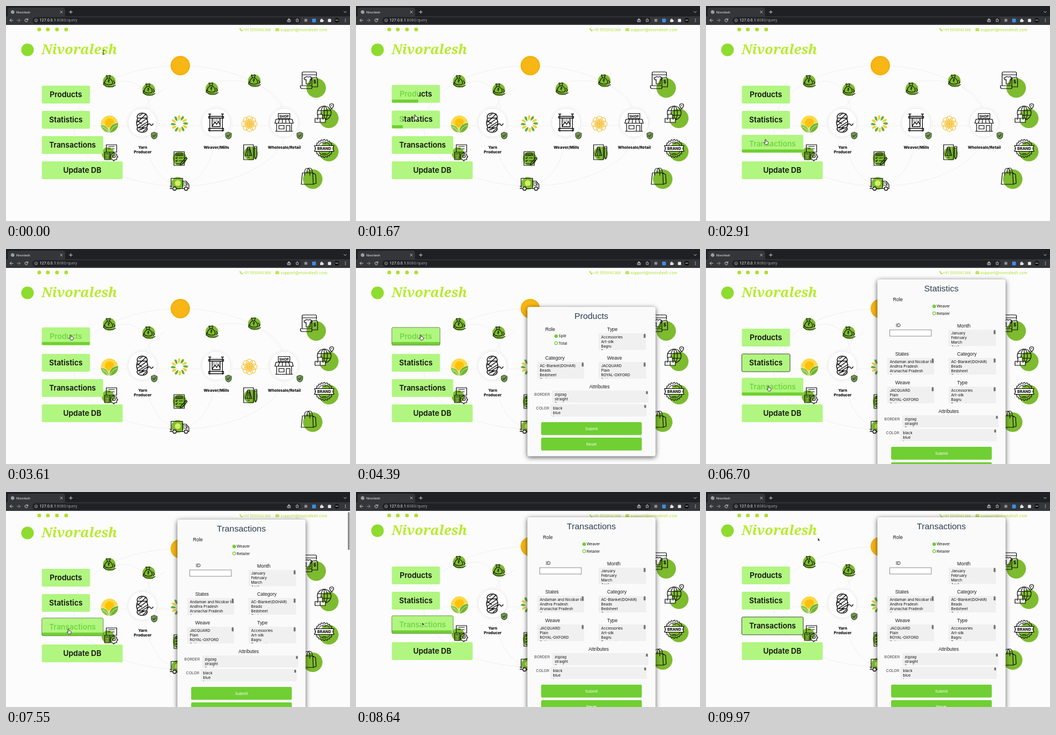
An HTML page with a canvas that plays this animation: 600x375 px, repeating every 10 s.

```html
<!DOCTYPE html>
<html lang="en">
<head>
<meta charset="utf-8">
<title>Supply chain dashboard</title>
<style>
html, body { margin: 0; width: 100%; height: 100%; overflow: hidden; background: #fcfcfc; }
canvas { display: block; width: 600px; height: 375px; }
</style>
</head>
<body>
<canvas id="stage"></canvas>
<script>
const canvas = document.getElementById('stage');
const ctx = canvas.getContext('2d');
const ratio = window.devicePixelRatio || 1;
canvas.width = 600 * ratio;
canvas.height = 375 * ratio;

const LOOP = 10000, TAU = Math.PI * 2;
const INTER = 'Inter, sans-serif', ARIAL = '"Liberation Sans", Arial, sans-serif';
const LEAF = '#7dbb2f', LIME = '#aee02c', PALE = '#b1f680', BRIGHT = '#70cf33', GOLD = '#f8b816';

const clamp = v => Math.max(0, Math.min(1, v));
const smooth = v => (v = clamp(v)) * v * (3 - 2 * v);

// cubic-bezier(.25, .1, .25, 1)
function ease(v) {
  if (v <= 0 || v >= 1) return clamp(v);
  let lo = 0, hi = 1;
  const curve = (s, a, b) => 3 * s * (1 - s) ** 2 * a + 3 * s * s * (1 - s) * b + s ** 3;
  for (let i = 0; i < 16; i++) {
    const mid = (lo + hi) / 2;
    if (curve(mid, .25, .25) < v) lo = mid; else hi = mid;
  }
  return curve(lo, .1, 1);
}

function text(str, x, y, size, color = '#111', { weight = 400, family = INTER, align = 'left', style = '' } = {}) {
  ctx.font = `${style} ${weight} ${size}px ${family}`;
  ctx.textAlign = align;
  ctx.fillStyle = color;
  ctx.fillText(str, x, y);
}

function box(x, y, w, h, color, r = 0) {
  ctx.fillStyle = color;
  ctx.beginPath();
  ctx.roundRect(x, y, w, h, r);
  ctx.fill();
}

function dot(x, y, r, color) {
  ctx.fillStyle = color;
  ctx.beginPath();
  ctx.arc(x, y, r, 0, TAU);
  ctx.fill();
}

function ring(x, y, r, color, width = 1, ry = r, from = 0, to = TAU) {
  ctx.strokeStyle = color;
  ctx.lineWidth = width;
  ctx.beginPath();
  ctx.ellipse(x, y, r, ry, 0, from, to);
  ctx.stroke();
}

function icon(x, y, d, { width = 1.2, color = '#111', fill } = {}) {
  const path = new Path2D(d);
  ctx.save();
  ctx.translate(x, y);
  ctx.lineWidth = width;
  ctx.lineJoin = ctx.lineCap = 'round';
  ctx.strokeStyle = color;
  if (fill) { ctx.fillStyle = fill; ctx.fill(path); }
  if (width) ctx.stroke(path);
  ctx.restore();
}

// Browser window

function drawBrowser() {
  box(0, 0, 600, 19, '#1f2023');
  box(3, 3, 100, 18, '#35363a', 4);
  box(0, 18, 600, 15, '#35363a');
  dot(11.5, 10.5, 3, '#b8babd');
  icon(11.5, 10.5, 'M-2-1l2 1-1 2M1-2l1 2', { width: .8, color: '#55575b' });
  text('Nivorlesh', 18, 12.7, 5.8, '#e4e5e7', { family: 'Roboto, sans-serif' });
  const pale = { width: .9, color: '#d5d7da' };
  icon(96.5, 10.5, 'M-1.7-1.7l3.4 3.4M1.7-1.7l-3.4 3.4', pale);
  icon(113, 10.5, 'M-2.7 0h5.4M0-2.7v5.4', pale);
  icon(591.5, 10.5, 'M-2-1l2 2 2-2', pale);
  icon(9.5, 25, 'M2.7 0h-5.4l2.5-2.5M-2.7 0l2.5 2.5', pale);
  icon(22, 25, 'M-2.7 0h5.4l-2.5-2.5M2.7 0l-2.5 2.5', { ...pale, color: '#97999d' });
  icon(35.5, 25, 'M2.4-1a2.6 2.6 0 1 0 0 2M2.6-3v2.2h-2.2', pale);
  box(46, 19.5, 468, 11.5, '#202124', 6);
  ring(52.5, 25, 2.5, '#b5b7ba', .8);
  box(52.1, 24.5, .8, 2, '#b5b7ba');
  const family = 'Roboto, sans-serif';
  text('127.0.0.1', 58.5, 27.4, 6.9, '#f1f1f1', { family });
  const hostWidth = ctx.measureText('127.0.0.1').width;
  text(':8080/query', 58.5 + hostWidth, 27.4, 6.9, '#95989d', { family });
  icon(493.5, 25, 'M-1-1h-1.5v3.5h5v-3.5h-1.5M0 1v-4l-1.5 1.5M0-3l1.5 1.5', pale);
  icon(508, 25, 'M0-3l.9 2 2.1.2-1.6 1.4.5 2.1-1.9-1.1-1.9 1.1.5-2.1-1.6-1.4 2.1-.2z', { ...pale, width: .7 });
  box(520.5, 22.5, 5, 5, '#8d9094', 1);
  box(534, 22, 6.5, 6.5, '#3c8eea', 1);
  icon(550.5, 25, 'M-2.5-1.5h1.7a1 1 0 1 1 1.8 0h1.5v1.6a1 1 0 1 1 0 1.8v1h-5z', { width: 0, fill: '#dfe1e3' });
  box(561.5, 22.5, 5.5, 5.5, '#e7e8ea', 1);
  dot(577, 25, 4, '#111');
  box(574.5, 24, 5, 1.3, '#aaa');
  for (const y of [22.7, 25, 27.3]) dot(592, y, .7, '#d5d7da');
}

// Page

function drawHeader() {
  for (const x of [58, 73, 89, 105]) dot(x, 41, 3.3, LIME);
  icon(409.7, 41.3, 'M-2-2l1-.7 1 1.5-.6.8 1.4 1.4.9-.6 1.4 1-.8 1.2c-2 .4-4.3-2.2-4.3-4.6z', { width: .4, color: LIME, fill: LIME });
  text('+91 5550142368', 413, 43.6, 6.2, LIME);
  box(470, 38.8, 6.5, 5, LIME, .8);
  icon(473.2, 40.8, 'M-3-1l3 2 3-2', { width: .7, color: '#fcfcfc' });
  text('support@nivoralesh.com', 479, 43.6, 6.9, LIME);
}

function drawLinks() {
  const line = '#ececec';
  ring(304, 209, 186, line, .8, 105);
  ring(304, 205, 64, line, .8, 107, .3, Math.PI - .3);
  ring(207, 180, 44, line, .8, 49, 4.1, TAU);
  ring(393, 190, 92, line, .8, 60, 4.4, TAU);
  ring(302, 200, 63, line, .8, 60, Math.PI, 4.3);
  icon(150, 209, 'M0 0h310', { width: .8, color: line });
}

function drawMoney(x, y) {
  dot(x, y + .5, 11, LEAF);
  icon(x, y, 'M-5-10l3 1 3-1 1 1-2 4c4 2 6 5 6 9-1 3-11 3-14 0 0-4 2-7 5-9l-2-4zM-3-5h4M-9 2l-1 4 5 3 11 1 5-3M7-1l3 4-2 2', { width: 1.1 });
  text('₹', x - .8, y + 3.2, 7, '#111', { weight: 700, align: 'center' });
}

function drawStage(x, lines) {
  dot(x, 203.5, 27, '#fff');
  ring(x, 203.5, 28, '#eee', .7);
  ring(x, 203.5, 25.5, '#ddd', .9);
  lines.forEach((line, i) => text(line, x + .5, 249 + i * 8, 6.8, '#0c0c0c', { weight: 800, align: 'center' }));
}

function drawShield(x) {
  icon(x, 226, 'M0-6l5 2v4c0 3-2 5-5 6-3-1-5-3-5-6v-4z', { width: 1.3, color: '#4a5446', fill: '#719b4b' });
  icon(x, 226, 'M-2.3 0l1.7 1.8 3-3.6', { color: '#26331f' });
}

function drawSun() {
  ctx.save();
  ctx.beginPath();
  ctx.arc(180.5, 206, 15, 0, TAU);
  ctx.clip();
  box(165, 190, 31, 32, '#fdd94a');
  dot(180.5, 204, 8, '#ffc107');
  icon(180.5, 206, 'M-17 1c9-1 15 3 17 14h-17z', { width: .8, color: '#fff', fill: '#8cc63f' });
  icon(180.5, 206, 'M17-3c-13 1-19 8-17 19h17z', { width: .8, color: '#fff', fill: '#72b52c' });
  icon(180.5, 206, 'M-12 5q7 2 10 9M13 2q-9 3-12 12', { width: .7, color: '#fff' });
  ctx.restore();
}

function drawSwirl() {
  for (let i = 0; i < 12; i++) {
    ctx.save();
    ctx.translate(302.5, 205.5);
    ctx.rotate(i * TAU / 12);
    icon(0, 0, 'M2-5C8-8 10-12 6-14 4-12 1-10 2-5z', { width: .4, color: '#fff', fill: i % 2 ? '#efcf35' : '#5ead42' });
    ctx.restore();
  }
}

function drawBlossom() {
  for (let i = 0; i < 8; i++) {
    const a = i * TAU / 8;
    ring(424.5 + 8.5 * Math.cos(a), 205.5 + 8.5 * Math.sin(a), 5, GOLD, 1);
    ring(424.5 + 4 * Math.cos(a), 205.5 + 4 * Math.sin(a), 4, GOLD, .7);
  }
}

function drawCoin() {
  dot(304, 104, 17, GOLD);
  ring(304, 104, 15.5, '#e9a40b', .8);
  ctx.setLineDash([1, 1.5]);
  for (const r of [12.5, 9, 5]) ring(304, 104, r, '#eaa50c', .8);
  ctx.setLineDash([]);
}

function drawChain() {
  drawLinks();
  drawCoin();
  [[180, 131], [249, 145.5], [359, 144], [433, 130]].forEach(p => drawMoney(...p));
  drawSun();
  drawSwirl();
  drawBlossom();

  drawStage(238, ['Yarn', 'Producer']);
  icon(237.5, 203.5, 'M-9-10c1-9 17-9 18 0l-1 2h-16zM-8-8l-2 8 2 9h16l2-9-2-8M-9 10c0 9 18 9 18 0M-8-1L7-15M-9 5L9-8M-7 9L10-2M-1 9l9-6M-9-4l8 6M-5-12l5-3M-5 13l9-4M2 15l5-4M8 9c1-7 5-9 7-5 1 2 3 0 4-2', { width: 1.4 });
  drawStage(366.5, ['Weaver/Mills']);
  icon(366.5, 203.5, 'M-11-15v30M11-15v30M-13-15h4M9-15h4M-13-11h26v3h-26zM-13 10h26v4h-26zM-7-8v15h14v-15M-7 6l5-7 3 4 3-5 3 6', { width: 1.3 });
  for (let x = 361; x < 374; x += 2.5) box(x, 196, .6, 7, '#333');
  drawStage(485, ['Wholesale/Retail']);
  icon(485, 203.5, 'M-10-16h20v9h-20zM-14-6h28l2 7h-32zM-13 2v13h26v-13M-15 15h30M-8-6l-2 7M-3-6v7M3-6v7M8-6l2 7M-9 5h9v6h-9zM4 15v-10h6v10');
  text('SHOP', 485, 194.5, 5.8, '#111', { weight: 800, align: 'center' });
  [258.5, 388, 512.5].forEach(drawShield);

  dot(178, 257.5, 11, LEAF);
  icon(181, 254, 'M-6-12h18v13h-18zM-3-5h4M-2-9h10M4-5h4M-9 1h9v13h-9zM-7 4h5M-7 8h1M-3 8h1M-7 11h1M-3 11h1M5 3l2-1 2 2 3 0v3l2 2-2 2v3h-3l-2 2-2-2h-3v-3l-2-2 2-2v-3z');
  ring(188.3, 262, 2.3, '#111', 1.1);
  dot(303, 266, 12, LEAF);
  icon(303, 265, 'M-10-11h18v24h-18zM-7-8h12v4h-12zM-7 0l1 1 2-2M-7 5l1 1 2-2M-1 0h6M-1 5h5M-7 10h8M11-1l2 2-9 10-3 1 1-3z');
  text('TEST', 302, 261, 4, '#111', { weight: 800, align: 'center' });
  dot(427, 257, 12, LEAF);
  icon(424.5, 255, 'M-10-13h17v26h-17zM-3-9l-4 15h11l-4-15zM-3 9h3M-2-6l-1 11M0-6l1 11M9-10h4v18l-2 4-2-4zM9-7h4');

  dot(299.5, 309.5, 11, LEAF);
  icon(303, 311.5, 'M-15-11h20v18h-20zM5-6h6l5 6v7h-11M8-3h3l2 4h-5M-14 3h-3M-13 7h-4');
  dot(299.5, 309, 5, '#d8ec6b');
  for (const x of [294, 314]) { dot(x, 318.5, 3.2, '#fff'); ring(x, 318.5, 3, '#111', 1.3); }

  dot(541, 143, 17, LEAF);
  icon(528.5, 130, 'M-12 8v-21q0-2 2-2h21q2 0 2 2v5M-12-10h25M-15 9h20v5h-17q-3 0-3-3zM-4-7l3 1 3-1 4 3-2 3-2-1v8h-7v-8l-2 1-2-3zM3-4l10-2 2 4v13h-10v-13z');
  text('$', 538.5, 134.5, 8, '#111', { weight: 700, align: 'center' });
  dot(563, 196, 17, LEAF);
  ring(555, 186.5, 12, '#111', 1.2);
  ring(555, 186.5, 5.5, '#111', 1.1, 12);
  icon(555, 186.5, 'M-11-4h22M-11 4h22M0-12v24');
  icon(548, 197, 'M-9-1h9v7h-9zM0-1h9v7h-9zM-4-8h8v7h-8zM-5-1v2M5-1v2', { fill: '#f6f9f0' });
  icon(568, 174.5, 'M0 5c-5-6-4-9 0-9s5 3 0 9zM-.5-1h1', { fill: '#fff' });
  dot(563, 254, 17, LEAF);
  ctx.beginPath();
  for (let i = 0; i < 40; i++) {
    const r = i % 2 ? 14 : 16, a = i * TAU / 40;
    ctx.lineTo(555 + r * Math.cos(a), 248.5 + r * Math.sin(a));
  }
  ctx.closePath();
  ctx.stroke();
  ring(555, 248.5, 11.5, '#111', 1);
  icon(555, 248.5, 'M-17-5h34l-2 5 2 5h-34l2-5z', { fill: '#f7faf2' });
  text('BRAND', 555, 251, 6.7, '#111', { weight: 800, align: 'center' });
  icon(555, 248.5, 'M-3-9h6M-3 9h6');
  dot(535, 302, 17, LEAF);
  icon(528, 298, 'M-11-7h18l1 20h-21zM7-7l5 3 1 15-5 2M-7-3v-6c0-8 9-8 9 0v6M-3-7v-3c0-7 9-7 9 0v3');
}

// Timeline

const buttons = [
  { label: 'Products', y: 139, w: 84, hover: [[1000, 1590], [3320, 4960]] },
  { label: 'Statistics', y: 183, w: 84, hover: [[1620, 2110], [3180, 3280], [5060, 6240]] },
  { label: 'Transactions', y: 227, w: 107, hover: [[2210, 3110], [6370, 8630]] },
  { label: 'Update DB', y: 271, w: 141, hover: [] }
];
const clicks = [3750, 5850, 6900];
const cursorPath = [
  [0, 170, 81], [600, 170, 81], [1080, 108, 149], [1450, 104, 156], [1590, 103, 170], [1670, 103, 190],
  [1900, 104, 197], [2050, 104, 207], [2250, 104, 233], [3060, 104, 233], [3400, 113, 150],
  [4850, 113, 150], [5120, 106, 193], [6180, 106, 193], [6420, 109, 239], [8520, 109, 239],
  [9250, 195, 80], [LOOP, 195, 80]
];

const isOver = (b, t) => b.hover.some(([from, to]) => t >= from && t < to);

function hoverAmount(b, t) {
  return b.hover.reduce((sum, [from, to]) => sum + ease((t - from) / 300) - ease((t - to) / 300), 0);
}

function drawButton(b, t, focused) {
  const h = hoverAmount(b, t), y = b.y - 2.2 * h, height = 31, x = 62.5, split = b.w * h;
  const label = color => text(b.label, x + b.w / 2, y + 20, 13, color, { weight: 600, align: 'center' });
  box(x, y, b.w, height, PALE, 2);
  label('#101010');
  if (h > 0) {
    ctx.save();
    ctx.beginPath();
    ctx.rect(x, y, split, height);
    ctx.clip();
    box(x, y, b.w, height, PALE, 2);
    label('#72d742');
    box(x, y + 25.5, b.w, 5.5, BRIGHT, [0, 0, 2, 2]);
    ctx.restore();
  }
  if (focused) {
    ctx.strokeStyle = '#30402a';
    ctx.lineWidth = .9;
    ctx.setLineDash(h > .5 ? [1.4, .9] : []);
    ctx.beginPath();
    ctx.roundRect(x, y, b.w, height, 2);
    ctx.stroke();
    ctx.setLineDash([]);
  }
}

// Query panels

const options = {
  Type: ['Accessories', 'Art-silk', 'Bagru', 'Banarasi'],
  Category: ['AC-Blanket(DOHAR)', 'Beads', 'Bedsheet', 'Curtain'],
  Weave: ['JACQUARD', 'Plain', 'ROYAL-OXFORD', 'Satin'],
  Month: ['January', 'February', 'March', 'April'],
  States: ['Andaman and Nicobar Islands', 'Andhra Pradesh', 'Arunachal Pradesh', 'Assam'],
  BORDER: ['zigzag', 'straight', 'floral'],
  COLOR: ['black', 'blue', 'brown']
};

const heading = (str, x, y) => text(str, x, y, 8.4, '#1c1c1c', { family: ARIAL });

function list(name, x, y, w, h) {
  ctx.save();
  ctx.beginPath();
  ctx.rect(x, y, w, h);
  ctx.clip();
  box(x, y, w, h, '#f0f0f0');
  options[name].forEach((item, i) => text(item, x + 4.5, y + 8.6 + i * 8.1, 6.5));
  box(x + w - 4.3, y + .8, 3.3, h > 25 ? 7.5 : 5.5, '#777', 1.6);
  ctx.restore();
}

function field(name, column, y) {
  heading(name, column ? 438 : 330, y);
  list(name, column ? 423 : 316, y + 4, column ? 83 : 82, 29);
}

function radios(labels, x, y) {
  labels.forEach((label, i) => {
    const cy = y + i * 12.2;
    if (i) ring(x, cy, 2.6, BRIGHT, 1.1); else dot(x, cy, 3.1, BRIGHT);
    text(label, x + 4.3, cy + 2.3, 6.5);
  });
}

function drawPanel(name) {
  const small = name === 'Products';
  const top = small ? 101 : 53, bottom = small ? 361.5 : 404.5;
  ctx.save();
  ctx.shadowColor = 'rgba(0,0,0,.65)';
  ctx.shadowBlur = 9 * ratio;
  ctx.shadowOffsetY = 2 * ratio;
  box(299, top, 223.5, bottom - top, '#fafafa', 4);
  ctx.restore();
  text(name, 410.5, top + 21.3, 15, '#2c3e50', { family: ARIAL, align: 'center' });

  let y;
  if (small) {
    heading('Role', 330, 143);
    radios(['Split', 'Total'], 349, 152);
    field('Type', 1, 143);
    field('Category', 0, 193);
    field('Weave', 1, 193);
    y = 243;
  } else {
    heading('Role', 326, 91);
    radios(['Weaver', 'Retailer'], 398, 100);
    heading('ID', 331, 136);
    box(320.5, 141, 72.5, 11, '#fff', 1);
    ctx.strokeStyle = '#777';
    ctx.lineWidth = .8;
    ctx.strokeRect(320.5, 141, 72.5, 11);
    field('Month', 1, 136.5);
    field('States', 0, 186);
    field('Category', 1, 186);
    field('Weave', 0, 236);
    field('Type', 1, 236);
    y = 286;
  }
  heading('Attributes', small ? 407 : 405.5, y);
  text('BORDER', 311, y + 13, 6.7, '#444');
  list('BORDER', 342, y + 4, 168, 21);
  text('COLOR', 314, y + 37, 6.7, '#444');
  list('COLOR', 339, y + 28, 168, 21);
  ['Submit', 'Reset'].forEach((label, i) => {
    const by = y + 59 + i * 27;
    box(323, by, 175.5, 22.5, BRIGHT, 2);
    text(label, 410.7, by + 13.6, 6.7, '#fff', { align: 'center' });
  });
}

// Pointer

function drawCursor(t) {
  const i = Math.max(1, cursorPath.findIndex(p => p[0] > t));
  const [t0, x0, y0] = cursorPath[i - 1], [t1, x1, y1] = cursorPath[i];
  const k = t1 - t0 < 200 ? (t - t0) / (t1 - t0) : smooth((t - t0) / (t1 - t0));
  const x = x0 + (x1 - x0) * k, y = y0 + (y1 - y0) * k;
  if (buttons.some(b => isOver(b, t))) {
    icon(x, y, 'M-1 0q1-1 1.6 0v2.7l2.8.6 1 1v2.2l-1 2.2h-3.7l-2.5-3.2q0-1.2 1.8 0z', { width: .8, fill: '#fff' });
  } else if (t < 5000 && x > 62 && x < 188 && y > 63 && y < 90) {
    icon(x, y, 'M-1.4-3.6l1.4.6 1.4-.6M0-3v6M-1.4 3.6l1.4-.6 1.4.6', { width: .9, color: '#222' });
  } else {
    icon(x, y, 'M0 0v5.7l1.3-1.2 1 2.1 1-.5-1-1.9h1.8z', { width: .7, color: '#fff', fill: '#000' });
  }
}

function render(now) {
  const t = now % LOOP;
  const active = clicks.filter(c => t >= c).length - 1;
  const scroll = 9 * smooth((t - 7390) / 300);
  ctx.setTransform(ratio, 0, 0, ratio, 0, 0);
  box(0, 0, 600, 375, '#fcfcfc');

  ctx.save();
  ctx.translate(0, -scroll);
  dot(37.5, 76.5, 11, '#8edc2e');
  text('Nivoralesh', 62, 83.5, 23.5, '#b5ec2d', { weight: 600, family: '"Noto Serif", serif', style: 'italic' });
  drawChain();
  buttons.forEach((b, i) => drawButton(b, t, i === active));
  ctx.restore();

  drawHeader();
  if (active >= 0) {
    ctx.save();
    ctx.translate(0, -scroll);
    drawPanel(buttons[active].label);
    ctx.restore();
  }

  if (t > 7390 && t < 8600) {
    ctx.globalAlpha = clamp((8600 - t) / 200);
    box(596.3, 34.5 + scroll * .1, 3, 66, '#858585', 1.5);
    ctx.globalAlpha = 1;
  }
  drawBrowser();
  drawCursor(t);
}

const start = performance.now();
function tick() {
  render(performance.now() - start);
  requestAnimationFrame(tick);
}
tick();
</script>
</body>
</html>
```
